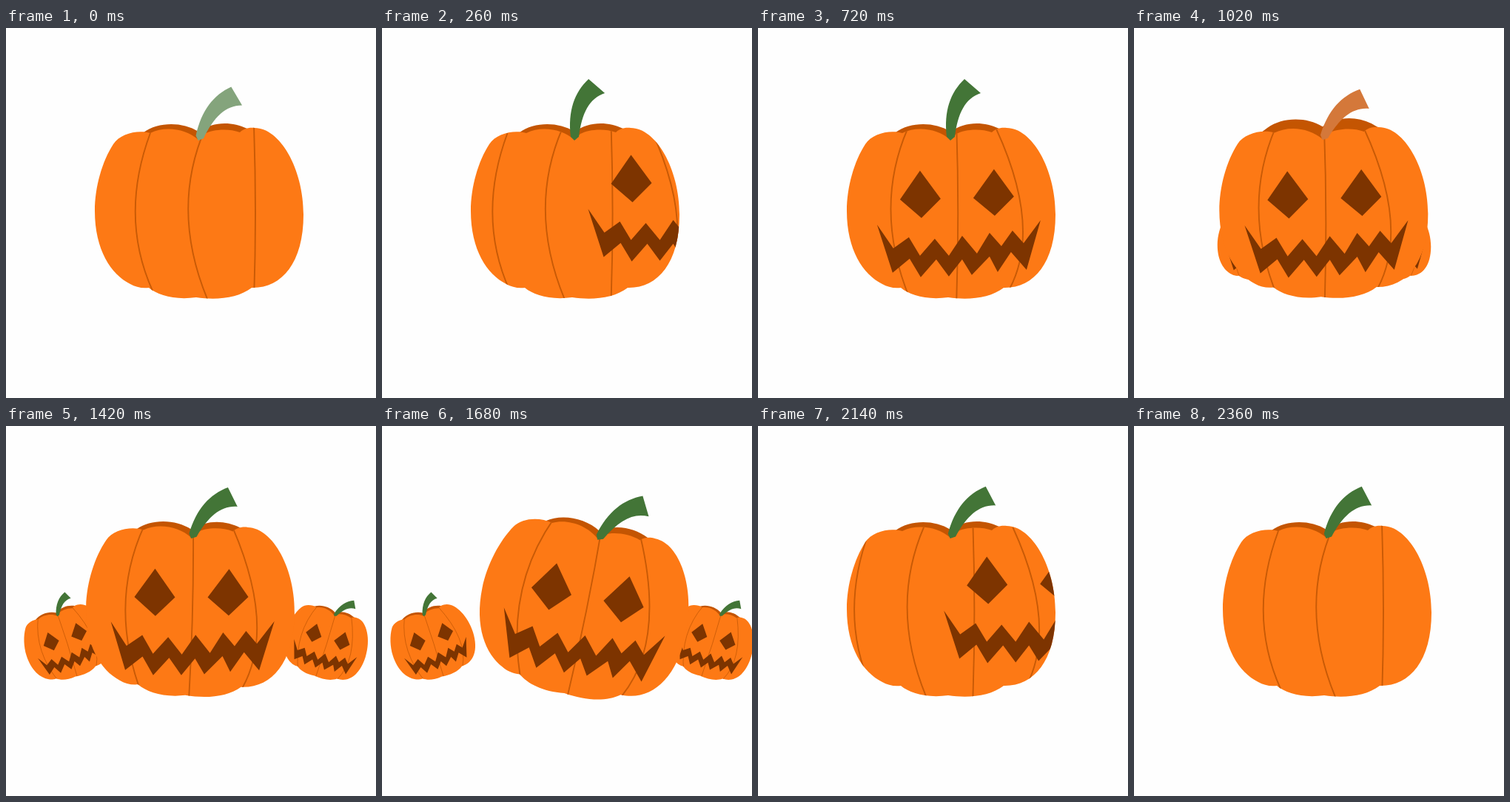
Write an HTML page with a canvas that moves like this. It is 500 px wide and 500 px high and loops after 2720 ms.

```html
<!DOCTYPE html>
<html>
<head>
<meta charset="utf-8">
<style>
html, body { margin: 0; width: 100%; height: 100%; overflow: hidden; background: #fefefe; }
canvas { display: block; width: 500px; height: 500px; }
</style>
</head>
<body>
<canvas id="stage" width="500" height="500"></canvas>
<script>
const ctx = document.getElementById('stage').getContext('2d');
const LOOP = 2720, LAST = 2360, STEP = 20;
const CENTER = [261, 251.5], STEM_BASE = [260, 151];

const body = new Path2D(`M195 142C178 137 154 143 145 157C130 180 120 215 120 247
  C120 300 142 333 168 346C175 350 183 352 193 351C205 361 228 368 257 364
  C285 368 314 365 332 351C372 352 402 318 402 252C402 190 370 135 336 135
  C327 134 320 137 316 141C300 135 279 137 268 143L260 151C243 136 215 132 195 142Z`);
const cap = new Path2D(`M168 154L186 141C205 127 238 126 260 140
  C280 126 305 126 326 136L338 143L316 152L260 160L190 152Z`);
const stem = new Path2D(`M255 147C251 112 260 87 279 69L301 88C280 95 270 115 266 147L260 152Z`);
const ribs = new Path2D(`M195 142Q153 255 198 355M269 136Q222 245 272 366
  M335 132Q339 250 335 368M389 137Q450 270 407 352`);
const face = new Path2D(`M219 193L247 231L221 257L192 232Z M319 191L346 228L320 254L291 230Z
  M161 266L183 298L204 283L219 308L239 285L258 308L276 281L296 305L313 277L329 295
  L344 274L359 291L382 260L363 327L342 303L324 330L313 309L289 334L276 313L258 336
  L241 313L220 337L205 312L182 331Z`);

const clamp = v => Math.min(1, Math.max(0, v));
const smooth = u => (1 - Math.cos(Math.PI * clamp(u))) / 2;

// Eased interpolation through [time, value] keys
function track(t, ...keys) {
  let value = keys[0][1];
  for (let i = 1; i < keys.length; i++) {
    const [t0, v0] = keys[i - 1], [t1, v1] = keys[i];
    if (t >= t0) value = v0 + (v1 - v0) * smooth((t - t0) / (t1 - t0));
  }
  return value;
}

function fill(path, color) {
  ctx.fillStyle = color;
  ctx.fill(path);
}

function pumpkin(x, y, degrees, scale, pose) {
  ctx.save();
  ctx.translate(x, y);
  ctx.rotate(degrees * Math.PI / 180);
  ctx.scale(scale, scale);
  ctx.translate(-CENTER[0], -CENTER[1]);

  ctx.save();
  ctx.translate(0, pose.capLift);
  fill(cap, '#c45502');
  ctx.restore();
  fill(body, '#fd7915');

  ctx.save();
  ctx.clip(body);
  ctx.save();
  ctx.translate(-pose.ribShift, 0);
  ctx.strokeStyle = '#c85a06';
  ctx.lineWidth = 1.9;
  ctx.stroke(ribs);
  ctx.restore();
  ctx.translate(pose.faceShift - 7, 1 - pose.faceShift * 0.18);
  fill(face, '#7d3400');
  ctx.restore();

  ctx.translate(...STEM_BASE);
  ctx.rotate(pose.stemTilt * Math.PI / 180);
  ctx.translate(-STEM_BASE[0], -STEM_BASE[1]);
  fill(stem, pose.stemColor);
  ctx.restore();
}

function stemColor(t) {
  if (t < 20) return '#84a47c';
  const tinted = (t >= 1000 && t < 1060) || (t >= 1900 && t < 1960);
  return tinted ? '#d4783a' : '#437537';
}

function draw(t) {
  const back = smooth((t - 1990) / 350);
  const ribLeft = 1 - clamp((t - 88) / 893);
  const faceLeft = 1 - clamp((t - 90) / 1063);
  const pose = {
    ribShift: 73 * (1 - ribLeft ** 2) * (1 - back),
    faceShift: 250 * Math.max(faceLeft ** 4, back),
    stemTilt: t < 600 ? 21.5 * (1 - clamp((t + 20) / 300)) ** 2
      : track(t, [840, 0], [1000, 24], [1150, 21.5]),
    capLift: track(t, [900, 0], [1000, -6], [1030, -6], [1120, 0]),
    stemColor: stemColor(t)
  };

  ctx.fillStyle = '#fefefe';
  ctx.fillRect(0, 0, 500, 500);

  if (t >= 940 && t < 2000) {
    const spread = track(t, [930, 60], [1220, 187], [1420, 175], [1680, 188], [2000, 60]);
    const lean = 17.5 * clamp((spread - 90) / 85);
    const small = { ...pose, capLift: 0, stemColor: '#437537' };
    for (const side of [-1, 1]) pumpkin(257 + side * spread, 295, side * lean, 0.4, small);
  }

  const x = track(t, [960, 0], [1100, -12], [1420, -12], [1700, 12], [1920, 12], [2140, 0]);
  const tilt = track(t, [1000, 0], [1215, -11.5], [1595, 11.5], [1920, 11.5], [2140, 0]);
  const hop = -32 * Math.sin(Math.PI * clamp((t - 760) / 262));
  pumpkin(CENTER[0] + x, CENTER[1] + hop, tilt, 1, pose);
}

const start = performance.now();
function tick() {
  const t = (performance.now() - start) % LOOP;
  draw(Math.min(LAST, Math.floor(t / STEP) * STEP));
  requestAnimationFrame(tick);
}
tick();
</script>
</body>
</html>
```
